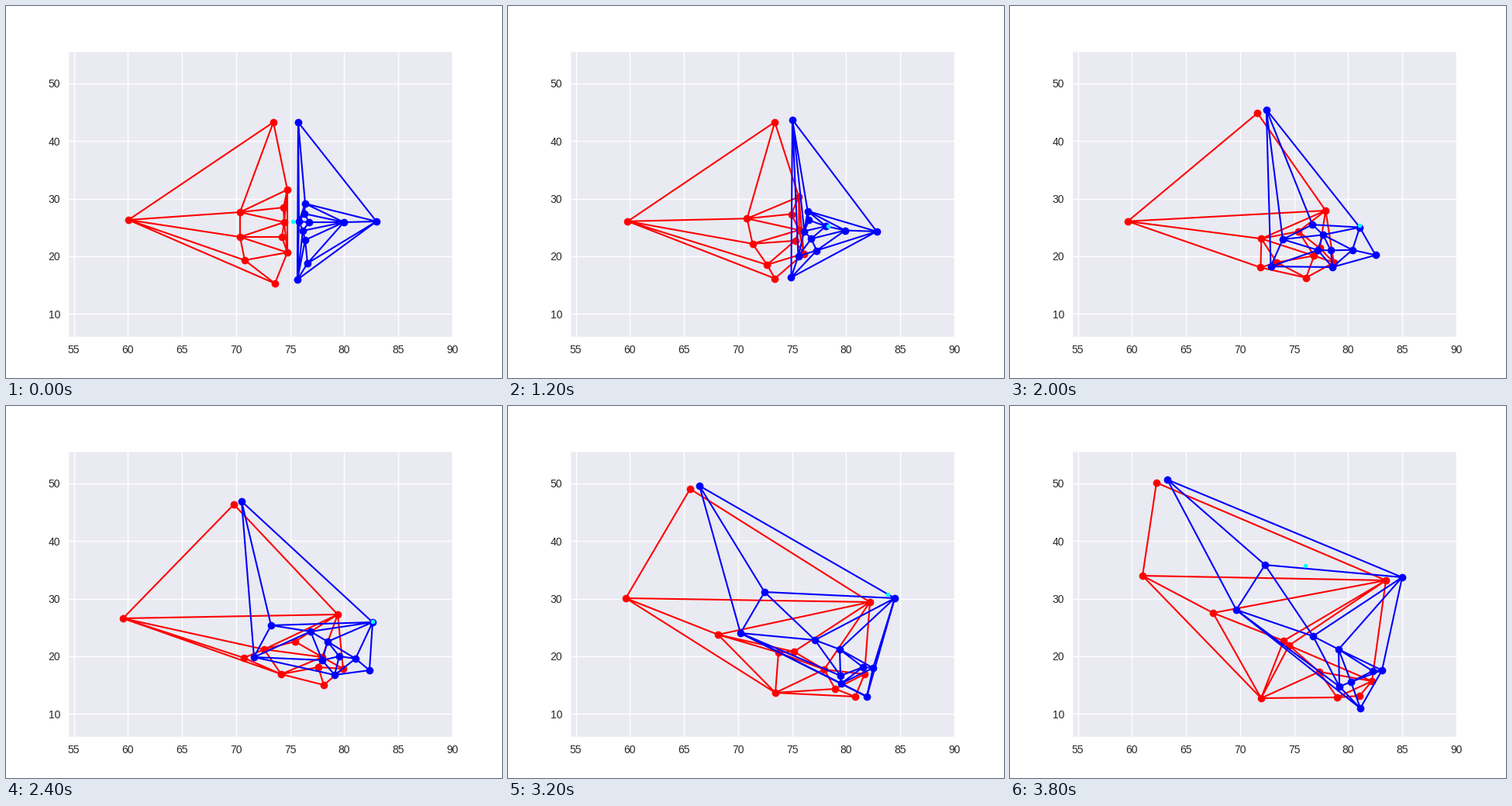
These frames come from a looping animation (640x480 px, 3900 ms). A matplotlib script:

```python
import numpy as np
import matplotlib.pyplot as plt
from matplotlib.animation import FuncAnimation
from matplotlib.tri import Triangulation

W, H, DPI = 640, 480, 100
FRAMES, INTERVAL = 39, 100
XLIM, YLIM = (54.45, 90), (5.95, 55.7)

# Waypoints in stage pixels, one row per player, one column per time
TIMES = np.array([0, 8, 16, 24, 28, 32, 38], float)

RED_X = [
    [158, 156, 153, 151, 150, 152, 171],
    [345, 345, 338, 294, 266, 235, 189],
    [302, 303, 316, 333, 341, 349, 353],
    [302, 305, 329, 355, 354, 345, 324],
    [308, 319, 355, 410, 433, 448, 451],
    [347, 349, 336, 307, 287, 271, 262],
    [363, 366, 389, 428, 449, 467, 485],
    [358, 361, 370, 373, 372, 369, 360],
    [359, 365, 388, 408, 410, 408, 399],
    [356, 361, 382, 403, 414, 422, 422],
    [363, 367, 400, 435, 450, 460, 467],
]
RED_Y = [
    [276, 277, 278, 274, 263, 248, 219],
    [150, 150, 147, 127, 116, 107, 99],
    [266, 267, 285, 314, 320, 318, 303],
    [298, 300, 317, 346, 360, 370, 377],
    [328, 328, 342, 360, 370, 375, 374],
    [358, 354, 347, 325, 311, 295, 267],
    [237, 239, 255, 269, 265, 253, 225],
    [260, 262, 278, 304, 314, 317, 309],
    [279, 280, 301, 324, 335, 340, 343],
    [298, 299, 310, 337, 352, 365, 376],
    [318, 318, 323, 339, 343, 346, 355],
]
BLUE_X = [
    [377, 375, 353, 304, 276, 247, 203],
    [478, 477, 474, 469, 466, 463, 452],
    [386, 386, 388, 393, 396, 396, 391],
    [385, 385, 394, 415, 424, 428, 424],
    [378, 379, 388, 408, 419, 429, 440],
    [391, 396, 429, 473, 489, 499, 506],
    [436, 436, 436, 451, 463, 471, 480],
    [383, 386, 400, 430, 446, 458, 468],
    [386, 391, 407, 424, 429, 430, 425],
    [389, 384, 363, 342, 335, 331, 329],
    [376, 374, 353, 320, 308, 300, 292],
]
BLUE_Y = [
    [150, 149, 142, 123, 112, 103, 95],
    [278, 282, 304, 341, 360, 375, 390],
    [255, 258, 273, 291, 298, 302, 297],
    [268, 269, 286, 304, 311, 314, 314],
    [278, 282, 302, 328, 339, 348, 356],
    [279, 280, 287, 279, 265, 248, 221],
    [279, 280, 302, 326, 333, 338, 341],
    [290, 294, 308, 323, 331, 337, 342],
    [302, 307, 326, 347, 354, 358, 362],
    [332, 327, 315, 283, 262, 240, 205],
    [353, 353, 345, 324, 309, 293, 263],
]

# The ball is dribbled, then passed in a straight line
BALL_T = [0, 8, 16, 24, 28, 31, 32, 38]
BALL_X = [370, 396, 430, 473, 492, 498, 490, 381]
BALL_Y = [278, 280, 287, 278, 263, 249, 243, 206]

plt.rcParams["font.family"] = "Liberation Sans"
plt.rcParams["font.size"] = 10


def smooth(rows):
    """Hermite curve through the waypoints, sampled at every frame."""
    p = np.array(rows, float)
    v = np.gradient(p, TIMES, axis=1, edge_order=2)
    t = np.arange(FRAMES)
    i = np.clip(np.searchsorted(TIMES, t, side="right") - 1, 0, len(TIMES) - 2)
    h = TIMES[i + 1] - TIMES[i]
    u = (t - TIMES[i]) / h
    return ((2 * u**3 - 3 * u**2 + 1) * p[:, i]
            + (u**3 - 2 * u**2 + u) * h * v[:, i]
            + (3 * u**2 - 2 * u**3) * p[:, i + 1]
            + (u**3 - u**2) * h * v[:, i + 1])


fig = plt.figure(figsize=(W / DPI, H / DPI), dpi=DPI, facecolor="white")
ax = fig.add_axes([0.125, 0.11, 0.775, 0.77], facecolor="#EAEAF2")
ax.set(xlim=XLIM, ylim=YLIM,
       xticks=range(55, 91, 5), yticks=range(10, 51, 10))
ax.set_axisbelow(True)
ax.grid(color="white", lw=1)
ax.tick_params(length=0, pad=7, labelcolor="0.15")
for spine in ax.spines.values():
    spine.set(color="white", linewidth=1)


def to_data(px, py):
    """Stage pixels to pitch units."""
    box = ax.get_position()
    x = XLIM[0] + (px / W - box.x0) / box.width * (XLIM[1] - XLIM[0])
    y = YLIM[0] + (1 - py / H - box.y0) / box.height * (YLIM[1] - YLIM[0])
    return x, y


class Team:
    def __init__(self, xs, ys, color, z):
        self.x, self.y = to_data(smooth(xs), smooth(ys))
        self.net, = ax.plot([], [], "-", color=color, lw=1.5, zorder=z)
        self.dots, = ax.plot([], [], "o", color=color, ms=6, zorder=z + 0.1)

    def show(self, n):
        x, y = self.x[:, n], self.y[:, n]
        edges = Triangulation(x, y).edges
        gaps = np.full((len(edges), 1), np.nan)
        self.net.set_data(np.hstack([x[edges], gaps]).ravel(),
                          np.hstack([y[edges], gaps]).ravel())
        self.dots.set_data(x, y)


teams = [Team(RED_X, RED_Y, "red", 3), Team(BLUE_X, BLUE_Y, "blue", 4)]
ball, = ax.plot([], [], "o", color="cyan", ms=3, zorder=5)


def update(n):
    for team in teams:
        team.show(n)
    x, y = to_data(np.interp(n, BALL_T, BALL_X), np.interp(n, BALL_T, BALL_Y))
    ball.set_data([x], [y])
    return []


anim = FuncAnimation(fig, update, frames=FRAMES, interval=INTERVAL,
                     repeat=True, repeat_delay=0)
plt.show()
```
